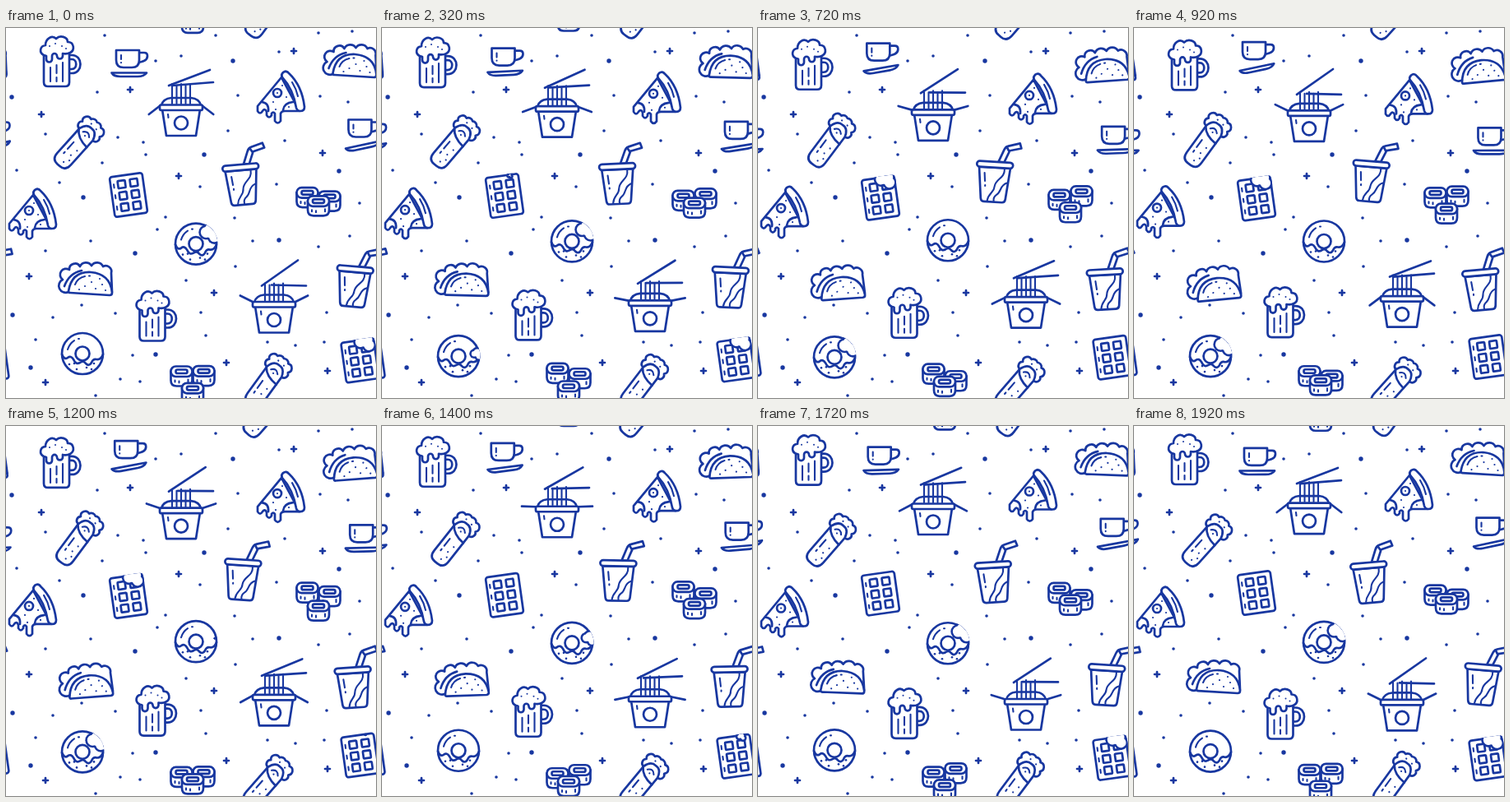
Write an HTML page that moves like this. It is 450x450 px and loops after 1.96 s.

```html
<!DOCTYPE html>
<html lang="en">
<head>
<meta charset="utf-8">
<title>Street food pattern</title>
<style>
html, body { margin: 0; width: 100%; height: 100%; overflow: hidden; background: #fff; }
svg { display: block; width: 100vw; height: 100vh; }
.ink { fill: #fff; stroke: #1837a0; stroke-width: 2.7; stroke-linecap: round; stroke-linejoin: round; }
.line { fill: none; }
.thin { fill: none; stroke-width: 2.1; }
.dot { fill: #1837a0; stroke: none; }
.blank { fill: #fff; stroke: none; }
</style>
</head>
<body>
<svg viewBox="0 0 450 450">
  <defs>
    <clipPath id="barClip"><rect x="-21.5" y="-26" width="43" height="52" rx="4"/></clipPath>
    <clipPath id="ringClip"><circle r="26.5"/></clipPath>
  </defs>
  <g class="ink">
    <g id="specks"></g>
    <g id="tile"></g>
    <use href="#tile" x="-450"/>
    <use href="#tile" y="-450"/>
  </g>
</svg>
<script>
const LOOP = 1960;
const wave = (t, peak) => Math.cos(2 * Math.PI * (t - peak) / LOOP);
const swing = t => (1 - wave(t, 0)) / 2;
const clamp = v => Math.max(0, Math.min(1, v));
const mix = (a, b, k) => a + (b - a) * k;

const path = (d, cls = '') => `<path class="${cls}" d="${d}"/>`;
const circle = (x, y, r, cls = '') => `<circle class="${cls}" cx="${x}" cy="${y}" r="${r}"/>`;
const box = (x, y, w, h, r) => `<rect x="${x}" y="${y}" width="${w}" height="${h}" rx="${r}"/>`;
const dots = (list, r = 1.3) => list.map(([x, y]) => circle(x, y, r, 'dot')).join('');
const move = (x, y, angle, content) => `<g transform="translate(${x} ${y}) rotate(${angle})">${content}</g>`;
const turn = (y, angle, cx, cy, content) =>
  `<g transform="translate(0 ${y}) rotate(${angle} ${cx} ${cy})">${content}</g>`;

// Scalloped bite: outlined union of three circles, kept inside the food's silhouette.
function bite(x, y, r, clip) {
  if (r <= 0) return '';
  const lobes = [[0, 0, 0.85], [-0.55, 0.15, 0.65], [0.3, 0.6, 0.65]];
  const layer = (grow, cls) => lobes.map(([dx, dy, k]) =>
    circle(x + dx * r, y + dy * r, Math.max(0, r * k + grow), cls)).join('');
  return `<g clip-path="url(#${clip})">${layer(1.3, 'dot')}${layer(-1.3, 'blank')}</g>`;
}

function beer(t) {
  return move(0, 4.5 * swing(t), 0,
    path('M76 33H80C94 33 94 55 80 55H76') +
    path('M76 38H80C87 38 87 50 80 50H76') +
    path('M46 30V66Q46 71 51 71H72Q77 71 77 66V29') +
    path('M54 48V65M61.5 45V55M61.5 60V65M69 42V65', 'thin') +
    path('M46 33C40 30 41 22 48 21C48 13 56 8 61 13C66 8 75 11 75 17C83 17 84 27 78 30Q74 32 69 31V34a3.5 3.5 0 0 1-7 0a3 3 0 0 0-6 0v4a3.5 3.5 0 0 1-7 0V34Z') +
    dots([[53, 22], [60, 19], [68, 22], [73, 25]], 1));
}

function cup(t) {
  const s = swing(t);
  return move(150, 56 - 7 * s, -12 * s,
      path('M-21.5-1.5H21Q18 3 10 3H-11Q-19 3-21.5-1.5Z')) +
    move(-2 * s, -10 * s, 0,
      path('M161 30H168Q172 30 172 34Q172 41 159 42') +
      path('M134 27H162V39Q162 48 153 48H143Q134 48 134 39Z') +
      path('M140 33V38M140 42V42.2', 'thin'));
}

function noodles(t) {
  const s = swing(t), y = 7 * s, top = 68 + 10 * s;
  const drop = 11 - 19 * s, reach = Math.sqrt(324 - drop * drop);
  const hinge = 94 + y;
  const strands = [202, 207.5, 213, 218.5, 224].map((x, i) =>
    `M${x} ${top + (i % 2) * 2}V${92 + y}`).join('');
  const stick = (x1, y1, x2, y2) => path(`M${x1} ${y1}L${x2} ${y2}`);
  return path(`M189 ${hinge}Q191 ${86 + y} 201 ${85 + y}H225Q235 ${86 + y} 237 ${hinge}`) +
    path(strands, 'thin') +
    stick(198, mix(70, 81, s), mix(248, 242, s), mix(51, 50, s)) +
    stick(mix(202, 210, s), mix(70, 80, s), 252, mix(66, 81, s)) +
    path(`M188 ${hinge}l${-reach} ${drop}M238 ${hinge}l${reach} ${drop}`) +
    move(0, y, 0,
      path('M190 99L195 131H231L236 99Z') +
      box(187, 93.5, 52, 6.5, 2) +
      circle(213, 115.5, 8) +
      path('M197 105L197.5 109', 'thin'));
}

function pizza(t) {
  const s = swing(t), sag = 2 - 2 * s;
  return move(0, 3.5 * s, 0,
    path(`M335 60L306 95V101q3 5 6 0q3-4 5 1v4q3 5 6 0v-2q2-3 4 0v${7 + sag}q3.5 5 7 0V104q1-3 5-3H357Z`) +
    path('M337 54Q341 51 344 55Q360 70 363 96Q363 101 358 101Q354 101 353 97Q349 74 336 60Q334 57 337 54Z') +
    circle(330, 79, 5) +
    path('M311 90Q320 91 319 101M337 100Q338 91 349 90', 'line') +
    dots([[330, 79], [325, 90], [341, 84], [336, 70], [328, 99], [344, 96]], 1.1) +
    path('M348 66Q353 74 355 83', 'thin'));
}

function taco(t) {
  const s = swing(t);
  return turn(5 * s, -6 * s, 100, 308,
      path('M76 321A6 6 0 0 1 69 306A7 7 0 0 1 77 294A7 7 0 0 1 90 290A8 8 0 0 1 104 289A8 8 0 0 1 118 290A7 7 0 0 1 128 298L129 321Z') +
      path('M71 314Q77 298 92 295', 'line')) +
    turn(7 * s, -9 * s, 103, 312,
      path('M76 320Q80 296 103 297Q127 299 129 322Q129 325 126 325L78 322Q76 322 76 320Z') +
      path('M84 312Q87 304 96 302M101 301.5H102', 'thin') +
      dots([[96, 314], [104, 309], [109, 317], [117, 312], [89, 318], [114, 305], [121, 319]], 1.1));
}

function burrito(t) {
  const s = swing(t);
  return move(88 + 0.5 * s, 140 - 3.5 * s, 42 - 6 * s,
    path('M-11-14A5 5 0 0 1-14-23A5.5 5.5 0 0 1-8-32A5.5 5.5 0 0 1 0-34A5.5 5.5 0 0 1 8-32A5.5 5.5 0 0 1 14-23A5 5 0 0 1 11-14Z') +
    path('M-11-14V26Q-11 36-2 36H2Q11 36 11 26V-14Q8-25 0-24Q-8-25-11-14Z') +
    path('M-11-13Q-5-4 11-3', 'line') +
    path('M-5-14Q0-20 5-14', 'thin') +
    dots([[0, -12], [-4, -28], [5, -27], [5, 8], [3, 17], [6, 23], [2, 29]], 1.1) +
    path('M-5 3V14M-5 19V21', 'thin'));
}

function chocolate(t) {
  const eaten = t > 1340 ? 0 : clamp((t - 200) / 500) * 11.5;
  const squares = [-14, 0, 14].map(y => box(-11, y - 4.5, 9, 9, 0.8) + box(4, y - 4.5, 9, 9, 0.8)).join('');
  return move(149, 203 + 4.5 * swing(t), -8,
    box(-20, -24.5, 40, 49, 3) + squares +
    path('M-16-15V-11M-16-2V2M-16 12V16', 'thin') +
    bite(10, -24, eaten, 'barClip'));
}

function donut(t) {
  const since = (t - 1200 + LOOP) % LOOP;
  const slide = clamp((since - 100) / 350);
  const eaten = since > 1160 ? 0 : 7 * clamp(since / 100) + 5 * slide;
  return move(231, 261.3 + 3.2 * wave(t, 1600), 0,
    circle(0, 0, 25) +
    path('M-25 1q3 7 7 4q4-3 7 2q3 7 8 4q4-3 7 1q4 4 7-1q2-5 6-4q5 1 8-6', 'line') +
    circle(0, 0, 8.5) +
    path('M-18-5Q-16-12-10-16M-5-18H-4', 'thin') +
    dots([[-16, 13], [-7, 19], [5, 17], [14, 12], [-10, 12], [11, 19]]) +
    bite(mix(23, 19, slide), mix(-4, -16, slide), eaten, 'ringClip'));
}

function drink(t) {
  const s = swing(t);
  return move(287, 190 - 4 * s, -5 + 10 * s,
    path('M4-24L10-39Q11.5-43 15-44L29-48L31-42L17-38.5L11-24Z') +
    path('M13-43L16-38', 'line') +
    path('M-19-17L-15 21Q-14.5 25-11 25H11Q14.5 25 15 21L19-17Z') +
    path('M12-16C13-4 2-4 1 6C1 14-6 14-7 24M16 1C7 4 10 12 4 16Q0 19 1 24', 'thin') +
    path('M-12-10L-11 0M-10.5 5V6', 'thin') +
    box(-22, -24, 44, 7, 3.5));
}

function sushi(t) {
  const roll = (x, y) => move(x, y + 1.3, 0,
    path('M-13 6V17Q-13 24-6 24H6Q13 24 13 17V6Z') +
    box(-13, 0, 26, 12.5, 6) +
    box(-7, 4, 14, 4.5, 2) +
    path('M-8 17V19M-3 18V20M8 16V19', 'thin'));
  return roll(366.5, 192.5 + 4.5 * wave(t, 470)) +
    roll(393.5, 194.5 + 3.5 * wave(t, 1750)) +
    roll(380, 203 + 9.5 * swing(t));
}

// Each food appears twice: offset of the second one, and its delay within the loop.
const foods = [
  [beer, 116.5, 305], [cup, 284.5, 94.5], [noodles, 113, 232.5], [pizza, -302, 139.5],
  [taco, 321.5, -265, 0], [burrito, 229.5, 293], [chocolate, 281.5, 197],
  [donut, -138, 136], [drink, 136, 128], [sushi, -153, 218]
];

const points = text => text.split(' ').map(p => p.split(','));
const small = points('182,40 213,34 111,78 282,82 382,83 416,90 270,125 339,137 136,133 117,164 167,139 170,154 48,129 13,173 65,188 236,193 329,190 430,213 184,245 194,230 278,231 300,259 380,266 418,253 48,271 103,259 219,307 279,290 57,352 92,337 133,347 237,346 243,374 36,379 154,398 163,430 139,427 109,447 318,382 352,386 387,382 390,346 380,6 421,4 332,29 255,9 120,9');
const large = points('276,40 7,84 241,154 94,206 405,174 157,274 332,258 8,349 182,397 30,413');
const pluses = points('350,28 151,75 43,105 385,152 210,180 28,302 253,322 268,407 48,431 391,417');

document.getElementById('specks').innerHTML = dots(small, 1.8) + dots(large, 2.7) +
  pluses.map(([x, y]) => path(`M${x - 3} ${y}h6M${x} ${y - 3}v6`, 'line')).join('');

const tile = document.getElementById('tile');

function draw(t) {
  tile.innerHTML = foods.map(([food, dx, dy, delay = LOOP / 2]) =>
    food(t) + move(dx, dy, 0, food((t + delay) % LOOP))).join('');
}

const start = performance.now();
function tick() {
  draw((performance.now() - start) % LOOP);
  requestAnimationFrame(tick);
}
tick();
</script>
</body>
</html>
```
